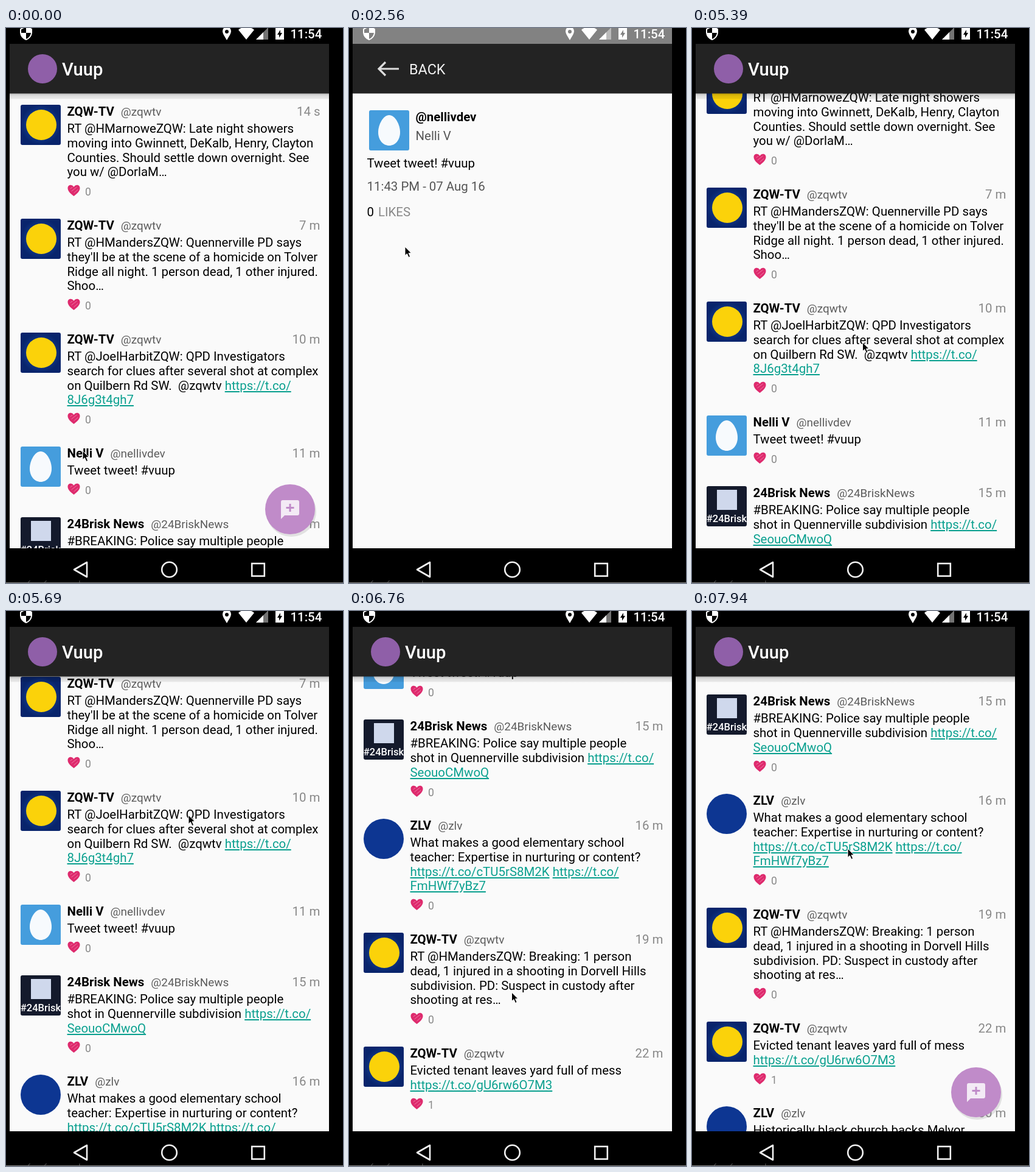
Write an HTML page that moves like this. It is 554 px wide and 911 px high and loops after 8 s.

```html
<!DOCTYPE html>
<html lang="en">
<head>
<meta charset="utf-8">
<title>Feed</title>
<style>
  html, body { margin: 0; width: 100%; height: 100%; overflow: hidden; background: #000; }
  svg { display: block; width: 554px; height: 911px; }
  text { font: 20.42px Roboto, sans-serif; white-space: pre; }
  .bold { font-weight: 700; }
  .handle { font-size: 18.96px; font-weight: 400; fill: #5c5c5c; }
  .time { fill: #888; text-anchor: end; }
  .link { fill: #0aa08f; text-decoration: underline 1.4px; text-decoration-skip-ink: none; }
  .count { font-size: 17.5px; fill: #888; }
</style>
</head>
<body>
<svg viewBox="0 0 554 911">
  <defs>
    <clipPath id="listArea"><rect x="6" y="107" width="525" height="747"/></clipPath>
    <clipPath id="screen"><rect x="6" y="0" width="525" height="911"/></clipPath>
    <linearGradient id="shade" x2="0" y2="1">
      <stop offset="0" stop-opacity=".28"/>
      <stop offset=".4" stop-opacity=".12"/>
      <stop offset=".9" stop-opacity=".07"/>
      <stop offset="1" stop-opacity="0"/>
    </linearGradient>
    <radialGradient id="studio">
      <stop offset="0" stop-color="#1c55b4"/>
      <stop offset="1" stop-color="#08246c"/>
    </radialGradient>
    <g id="station">
      <rect width="66" height="66" rx="3" fill="url(#studio)"/>
      <circle cx="34" cy="33" r="25" fill="#fbd20a"/>
    </g>
    <g id="egg">
      <rect width="66" height="66" rx="3" fill="#459ddd"/>
      <path d="M33 8C43 8 51 24 51 36C51 49 43 58 33 58S15 49 15 36C15 24 23 8 33 8Z" fill="#f7fafd"/>
    </g>
    <g id="news">
      <rect width="66" height="66" rx="3" fill="#141a2c"/>
      <rect x="17" y="6" width="33" height="33" fill="#cfd8ec"/>
      <text x="33" y="59" text-anchor="middle" fill="#fff" style="font-size:16.500px;font-weight:500">#24Brisk</text>
    </g>
    <circle id="paper" cx="33" cy="33" r="33" fill="#0d3692"/>
    <g id="heart">
      <path d="M0 9C-5 5-10 1-10-4C-10-10-3-11 0-6C3-11 10-10 10-4C10 1 5 5 0 9Z" fill="#de2a6d"/>
      <path d="M-6-3L-2-6M-4 1L5-6M0 4L7-2" stroke="#f07aa5" fill="none"/>
    </g>
  </defs>

  <rect width="554" height="911"/>

  <rect x="6" y="107" width="525" height="747" fill="#fafafa"/>
  <g clip-path="url(#listArea)"><g id="list"></g></g>
  <rect x="6" y="107" width="525" height="10" fill="url(#shade)"/>
  <g id="fab">
    <circle cx="2" cy="4" r="41" opacity=".1"/>
    <circle r="41" fill="#c08bc9"/>
    <path d="M-12-15H12Q15-15 15-12V7Q15 10 12 10H-9L-15 16V-12Q-15-15-12-15Z" fill="#f3eaf5"/>
    <path d="M0-9V4M-6.5-2.5H6.5" stroke="#c08bc9" stroke-width="3"/>
  </g>
  <rect x="6" y="26" width="525" height="81.500" fill="#232323"/>
  <circle cx="60" cy="67" r="24" fill="#8f5fa8"/>
  <text x="92" y="78" fill="#fff" style="font-size:29.17px;font-weight:500">Vuup</text>

  <g clip-path="url(#screen)">
    <g id="detail">
      <rect x="6" y="-80" width="525" height="106" fill="#828282"/>
      <rect x="6" y="107" width="525" height="747" fill="#fafafa"/>
      <rect x="6" y="26" width="525" height="81.500" fill="#232323"/>
      <path d="M82 67H50M60 56L49 67L60 78" fill="none" stroke="#ddd" stroke-width="3.2"/>
      <text x="99" y="76" fill="#f2f2f2" style="font-size:23.33px">BACK</text>
      <use href="#egg" x="33" y="135"/>
      <text class="bold" x="109.500" y="153">@nellivdev</text>
      <text x="109.500" y="184" fill="#555">Nelli V</text>
      <text x="29.500" y="229">Tweet tweet! #vuup</text>
      <text x="29.500" y="267" fill="#555">11:43 PM - 07 Aug 16</text>
      <text x="29.500" y="309">0</text>
      <text x="48" y="309" fill="#888">LIKES</text>
    </g>
  </g>

  <g fill="#fff">
    <path d="M24 2L33-3L42 2V8Q41 16 33 19Q25 16 24 8Z" fill="none" stroke="#fff" stroke-width="2"/>
    <path d="M33-3L42 2V8H33ZM24 8H33V19Q25 16 24 8Z"/>
    <path fill-rule="evenodd" d="M363 20C359 13 356 9 356 5A7 7 0 0 1 370 5C370 9 367 13 363 20ZM363 3A3 3 0 0 0 363 9A3 3 0 0 0 363 3Z"/>
    <path d="M382 3Q395-7 408 3L395 19Z"/>
    <path d="M411 19L431-1V19Z" opacity=".45"/>
    <path d="M411 19L423 7V19Z"/>
    <path fill-rule="evenodd" d="M443 0H457V19H443ZM451 3L446 11H449V16L454 8H451Z"/>
    <text x="467.500" y="16.500" style="font-weight:500">11:54</text>
  </g>
  <g fill="none" stroke="#f2f2f2" stroke-width="2.6">
    <path d="M133 877V901L112 889Z" stroke-linejoin="round"/>
    <circle cx="268.500" cy="889" r="12.300"/>
    <rect x="404.200" y="879" width="20.600" height="20.600"/>
  </g>
  <path d="M37 911V909Q38 907 40 908M64 911V909Q65 907 67 908M121 907V911" fill="none" stroke="#666"/>
  <rect y="910" width="554" height="1" fill="#888"/>

  <path id="pointer" d="M0 0V14.500L3.400 11.500L6 17.500L8.600 16.300L6 10.600H10.500Z" stroke="#fff"/>
</svg>

<script>
const DURATION = 8000, REFRESH = 150, LINE = 23.8, ROW = 115.6, TOP = 126;
const get = id => document.getElementById(id);
const clamp = v => Math.min(1, Math.max(0, v));
const progress = (t, start, end) => clamp((t - start) / (end - start));

const station = ['station', 'ZQW-TV', '@zqwtv'];
const paper = ['paper', 'ZLV', '@zlv'];

// [author, age, likes, lines]; square brackets mark links
const posts = [
  [station, '14 s', 0, ['RT @HMarnoweZQW: Late night showers', 'moving into Gwinnett, DeKalb, Henry, Clayton',
    'Counties. Should settle down overnight. See', 'you w/ @DorlaM…']],
  [station, '7 m', 0, ['RT @HMandersZQW: Quennerville PD says', "they'll be at the scene of a homicide on Tolver",
    'Ridge all night. 1 person dead, 1 other injured.', 'Shoo…']],
  [station, '10 m', 0, ['RT @JoelHarbitZQW: QPD Investigators', 'search for clues after several shot at complex',
    'on Quilbern Rd SW.  @zqwtv [https://t.co/]', '[8J6g3t4gh7]']],
  [['egg', 'Nelli V', '@nellivdev'], '11 m', 0, ['Tweet tweet! #vuup']],
  [['news', '24Brisk News', '@24BriskNews'], '15 m', 0, ['#BREAKING: Police say multiple people',
    'shot in Quennerville subdivision [https://t.co/]', '[SeouoCMwoQ]']],
  [paper, '16 m', 0, ['What makes a good elementary school', 'teacher: Expertise in nurturing or content?',
    '[https://t.co/cTU5rS8M2K] [https://t.co/]', '[FmHWf7yBz7]']],
  [station, '19 m', 0, ['RT @HMandersZQW: Breaking: 1 person', 'dead, 1 injured in a shooting in Dorvell Hills',
    'subdivision. PD: Suspect in custody after', 'shooting at res…']],
  [station, '22 m', 1, ['Evicted tenant leaves yard full of mess', '[https://t.co/gU6rw6O7M3]']],
  [paper, '30 m', 0, ['Historically black church backs Melvor']]
];

function postMarkup([[avatar, name, handle], age, likes, lines], y) {
  const baseline = i => Math.round(y + 46 + i * LINE);
  const body = lines.map((line, i) => {
    const rich = line.replace(/\[(.*?)\]/g, '<tspan class="link">$1</tspan>');
    return `<text x="100.500" y="${baseline(i)}">${rich}</text>`;
  }).join('');
  const last = baseline(lines.length - 1);
  return `<use href="#${avatar}" x="24" y="${y}"/>
    <text class="bold" x="100.500" y="${y + 18}">${name}<tspan class="handle" dx="11">${handle}</tspan></text>
    <text class="time" x="516.500" y="${y + 18}">${age}</text>${body}
    <use href="#heart" x="111.500" y="${last + 24}"/>
    <text class="count" x="130" y="${last + 31.5}">${likes}</text>`;
}

let nextY = TOP;
get('list').innerHTML = posts.map(post => {
  const markup = postMarkup(post, Math.round(nextY));
  nextY += ROW + (post[3].length - 1) * LINE;
  return markup;
}).join('');

const moves = [
  { from: 1350, to: 2400, x: 255, y: 254 },
  { from: 2400, to: 2550, x: 92, y: 359 },
  { from: 2550, to: 2700, x: 49, y: 236 },
  { from: 2850, to: 3450, x: 40, y: 62 },
  { from: 4350, to: 4650, x: 261, y: 697 },
  { from: 5100, to: 5700, x: 300, y: 335 },
  { from: 5700, to: 6150, x: 268, y: 656 },
  { from: 6450, to: 7050, x: 267, y: 596 },
  { from: 7050, to: 7800, x: 256, y: 390 }
];

function pointerAt(t) {
  return moves.reduce(([x, y], move) => {
    const k = progress(t, move.from, move.to);
    return [x + (move.x - x) * k, y + (move.y - y) * k];
  }, [126, 694]);
}

// A drag, a fling that slows down, then a slow drag
function scrollAt(t) {
  const fling = 1 - (1 - progress(t, 5700, 6000)) ** 3;
  return Math.round(205 * progress(t, 5100, 5700) ** 2 + 381 * fling + 80 * progress(t, 6450, 7060));
}

// The button shrinks away while the list is moving.
const fabScale = t => 1 - clamp((scrollAt(t) - scrollAt(t - REFRESH)) / 18);

function detailPose(t) {
  if (t < 4500) {
    const age = t - 1297;
    return { y: 75 * (1 - clamp(age / 350)) ** 5, alpha: 1 - (1 - clamp(age / 200)) ** 4 };
  }
  return { y: 75 * progress(t, 4575, 4850) ** 2, alpha: 1 - progress(t, 4616, 4816) };
}

function render(time) {
  const t = Math.floor((time + 10) / REFRESH) * REFRESH;
  const detail = detailPose(t);
  get('detail').setAttribute('transform', `translate(0 ${detail.y})`);
  get('detail').setAttribute('opacity', detail.alpha);
  get('list').setAttribute('transform', `translate(0 ${-scrollAt(t)})`);
  get('fab').setAttribute('transform', `translate(467 790) scale(${fabScale(t)})`);
  get('pointer').setAttribute('transform', `translate(${pointerAt(t).join(' ')})`);
}

const start = performance.now();
function loop() {
  render((performance.now() - start) % DURATION);
  requestAnimationFrame(loop);
}
loop();
</script>
</body>
</html>
```
